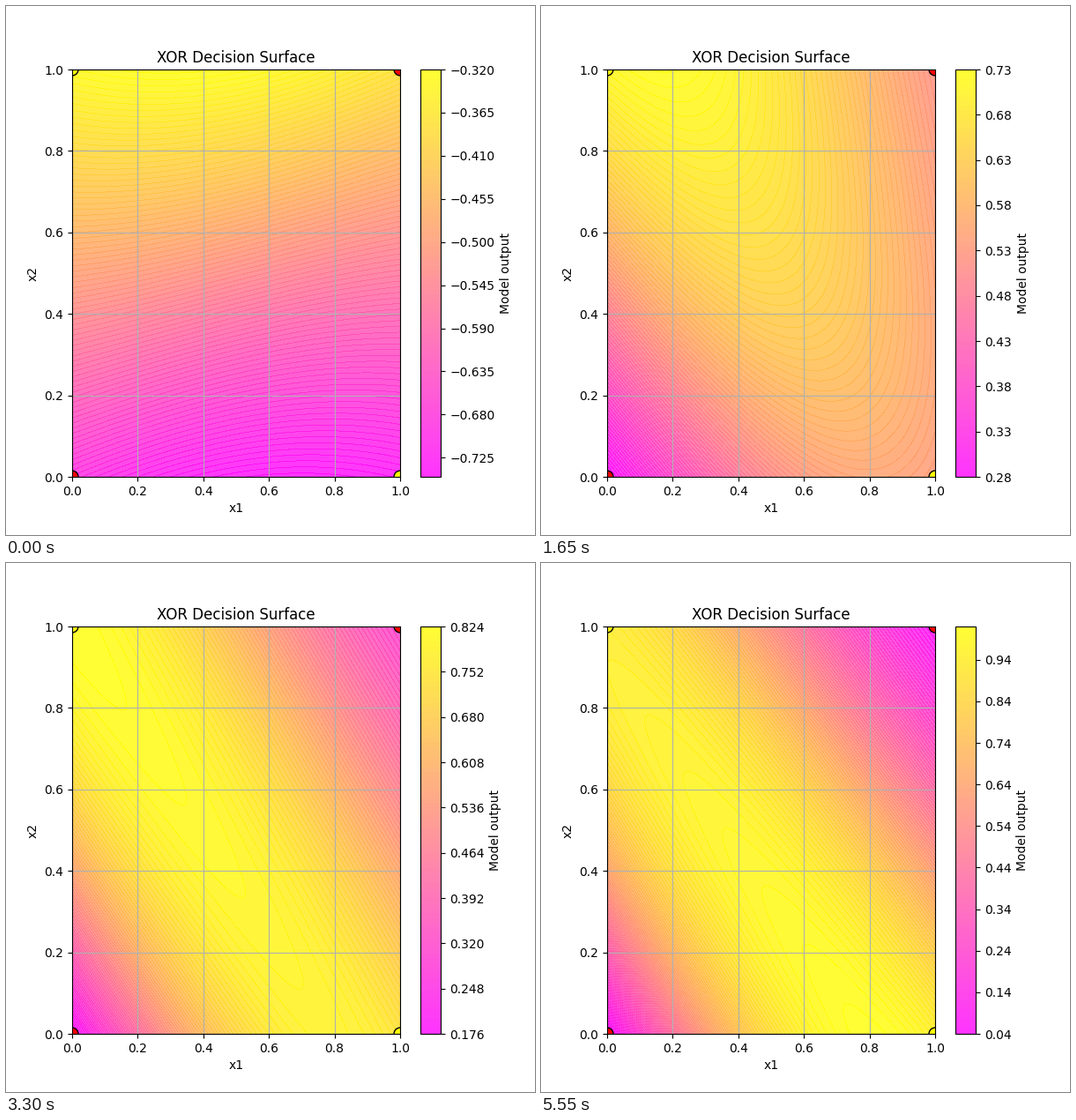
A matplotlib script for the animation above (5.7 s loop, 600 by 600 pixels).

```python
import numpy as np
import matplotlib.pyplot as plt
from matplotlib.animation import FuncAnimation

FRAMES = 38
INTERVAL = 150
WARMUP = 7     # steps in which the output climbs to the targets
SETTLED = 26   # step from which the hidden weights stay put
GRID = np.linspace(0, 1, 100)
X1, X2 = np.meshgrid(GRID, GRID)


def clamp(value):
    return min(max(value, 0), 1)


def ease_out(t):
    return 1 - (1 - t) ** 2


def path(start, bend, end, first, second):
    """Move weights from start to bend, then on to end."""
    start, bend, end = map(np.array, (start, bend, end))
    return start + (bend - start) * first + (end - bend) * second


def unit(weights):
    w1, w2, bias, gain = weights
    return gain * np.tanh(w1 * X1 + w2 * X2 + bias)


def output_range(step):
    keys = [0, WARMUP, 18, 31, FRAMES - 1]
    low = np.interp(step, keys, [-0.743, 0.315, 0.221, 0.087, 0.044])
    high = np.interp(step, keys, [-0.322, 0.703, 0.766, 0.951, 1.015])
    return low, high


def surface(step):
    """Two tanh units: one rises past OR, the other falls past AND."""
    warm = ease_out(clamp(step / WARMUP))
    train = clamp((step - WARMUP) / (SETTLED - WARMUP))
    rise = path((0.45, 0.8, -0.6, 0.65), (1.0, 1.0, -0.35, 1.05),
                (1.6, 1.3, -0.13, 1.42), warm, ease_out(train))
    fall = path((1.2, -1.2, 0, 0.42), (1.6, 0.3, -1.5, 0.56),
                (1.43, 1.3, -1.95, 0.97), warm, train)
    z = unit(rise) - unit(fall)
    low, high = output_range(warm * WARMUP if step < WARMUP else step)
    return low + (high - low) * (z - z.min()) / (z.max() - z.min())


def draw(step):
    fig.clear()
    ax = fig.add_subplot()
    filled = ax.contourf(X1, X2, surface(step), levels=100,
                         cmap="spring", alpha=0.8)
    fig.colorbar(filled, ax=ax, label="Model output")
    ax.scatter([0, 0, 1, 1], [0, 1, 0, 1], c=[0, 1, 1, 0],
               cmap="autumn", edgecolors="k", s=100)
    ax.set(xlim=(0, 1), ylim=(0, 1), xlabel="x1", ylabel="x2",
           title="XOR Decision Surface")
    ax.grid(True)
    return []


fig = plt.figure(figsize=(6, 6), dpi=100)
anim = FuncAnimation(fig, draw, frames=FRAMES, interval=INTERVAL,
                     init_func=lambda: [], repeat=True, repeat_delay=0)
plt.show()
```
